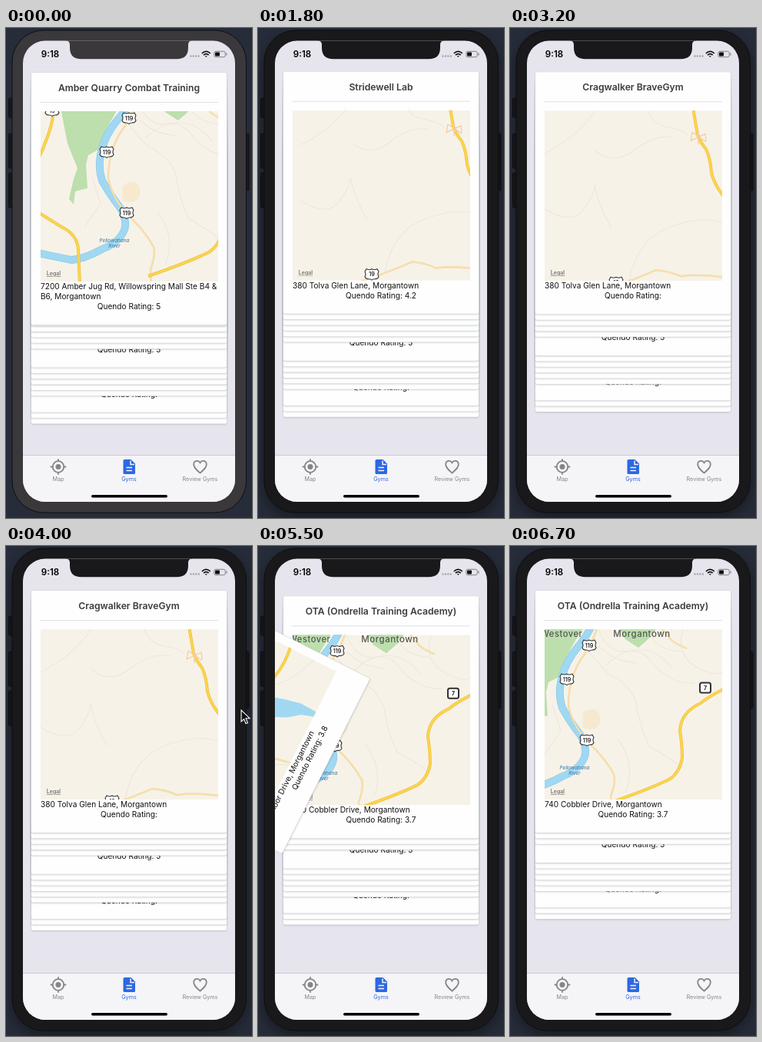
An HTML page that plays this animation: 320 by 636 pixels, repeating every 6.8 s.

```html
<!DOCTYPE html>
<html lang="en">
<head>
<meta charset="utf-8">
<title>Gym cards</title>
<style>
html, body { margin: 0; width: 100%; height: 100%; overflow: hidden; background: #262c39; }
body, svg text { font-family: Inter, Roboto, sans-serif; }
#frame, #screen, #pointer { position: absolute; left: 0; top: 0; width: 320px; height: 636px; overflow: hidden; }
#screen { background: #e6e5ee; clip-path: inset(16.5px 22px 21px 22px round 29px); }
#ui { position: absolute; left: 0; top: 0; z-index: 50; }
#body { fill: #3a383b; }
.active #body { fill: #19181a; filter: drop-shadow(0 6px 8px rgba(0, 0, 0, .4)); }
.card {
  position: absolute; left: 33px; top: 0; width: 254px; box-sizing: border-box;
  background: #fefefe; border-radius: 2px; color: #111; font-size: 10.15px; line-height: 12.5px;
  box-shadow: 0 0 0 .5px #d2d6dc, 0 1.3px 2.2px rgba(0, 0, 0, .16);
}
.card > * { position: absolute; white-space: nowrap; }
.title {
  left: 0; width: 254px; top: 10px; line-height: 19px; text-align: center;
  font-size: 12.2px; font-weight: 600; color: #3b3b3d;
}
.rule { left: 11px; width: 232px; top: 38px; height: 1px; background: #dfe1e5; }
.card svg { left: 12px; top: 50px; }
.address { left: 12px; top: 271px; }
.rating { left: 0; width: 254px; text-align: center; }
</style>
</head>
<body>
<svg id="frame" viewBox="0 0 320 636">
  <g fill="#18191d" stroke="#101115">
    <rect x="3.5" y="91" width="7" height="25" rx="1.5"/>
    <rect x="3.5" y="137" width="7" height="45" rx="1.5"/>
    <rect x="3.5" y="188" width="7" height="45" rx="1.5"/>
    <rect x="309" y="137" width="7" height="74" rx="1.5"/>
  </g>
  <rect id="body" x="8" y="3" width="304.5" height="626" rx="41" stroke="#0f0f12"/>
</svg>

<div id="screen">
  <svg id="ui" width="320" height="636">
    <path id="notch" d="M78 16V16.500Q83 16.500 83 22V25.500Q83 40.300 98 40.300H222Q237 40.300 237 25.500V22Q237 16.500 242 16.500V16Z"/>
    <text x="57.5" y="38" font-size="11.6" font-weight="600" text-anchor="middle">9:18</text>
    <path d="M239.5 36.5H252" stroke="#9a9aa2" stroke-width="2" stroke-dasharray="2 1.4"/>
    <g fill="none" stroke="#111" stroke-width="1.7">
      <path d="M254.8 33Q260.3 27.8 265.8 33M256.9 35.2Q260.3 32 263.7 35.2"/>
      <path d="M258.7 36.2L260.3 38L261.9 36.2Z" fill="#111" stroke="none"/>
      <rect x="270.8" y="30.3" width="14.4" height="7.4" rx="2" stroke="#77777e" stroke-width=".9"/>
      <rect x="272" y="31.5" width="6" height="5" rx="1" fill="#111" stroke="none"/>
      <path d="M287 32.6V35.4" stroke="#77777e" stroke-width="1.1"/>
    </g>
    <rect x="20" y="554" width="280" height="64" fill="#f5f4f7"/>
    <path d="M20 554.5H300" stroke="#cbcbd1"/>
    <g fill="none" stroke="#858589" stroke-width="1.8">
      <circle cx="68" cy="569.5" r="7.3"/>
      <path d="M68 559.2V563M68 576V579.8M57.7 569.5H61.5M74.5 569.5H78.3"/>
      <circle cx="68" cy="569.5" r="3.5" fill="#858589" stroke="none"/>
      <path d="M252.5 577.6C247.5 573.3 244.2 570.3 244.2 566.5C244.2 561.3 250.3 560.3 252.5 564.3C254.7 560.3 260.8 561.3 260.8 566.5C260.8 570.3 257.5 573.3 252.5 577.6Z"/>
    </g>
    <path d="M154.5 560H162.5L168 565.5V577.5Q168 579 166.5 579H154.5Q152.5 579 152.5 577.5V561.5Q152.5 560 154.5 560Z" fill="#2b68e3"/>
    <path d="M162 561.5V566.5H167M156.5 570.5H164M156.5 574.5H164" fill="none" stroke="#f5f4f7" stroke-width="1.5"/>
    <g font-size="7.2" text-anchor="middle" fill="#858589">
      <text x="68" y="588">Map</text>
      <text x="160" y="588" fill="#2b68e3">Gyms</text>
      <text x="252.5" y="588">Review Gyms</text>
    </g>
    <rect x="111" y="606" width="99" height="3.5" rx="1.75"/>
  </svg>
</div>

<svg id="pointer" viewBox="0 0 320 636">
  <path id="arrow" d="M0 0V15L3.5 11.7L6 17.5L8.5 16.4L6 10.7H11Z" fill="#111" stroke="#fff" stroke-width="1.1"/>
</svg>

<script>
const LOOP = 6800, STEP = 7.36, REST = 58, TILT = 0.2986, FOCUS = 1000;

// map drawing helpers
const line = (d, color, w) =>
  `<path d="${d}" fill="none" stroke="${color}" stroke-width="${w}" stroke-linejoin="round"/>`;
const area = (d, color) => `<path d="${d}" fill="${color}"/>`;
const highway = d => line(d, '#e8bd4c', 4) + line(d, '#fcd548', 2.8);
const road = d => line(d, '#ecd09a', 2.3) + line(d, '#fbe3ab', 1.4);
const lane = d => line(d, '#ede6dc', 1.1);
const label = (x, y, s, size, color, extra = '') =>
  `<text x="${x}" y="${y}" font-size="${size}" fill="${color}" text-anchor="middle" ${extra}>${s}</text>`;
const shield = (x, y, n) => `<g transform="translate(${x} ${y})">
  <path d="M-7-7Q-3-5 0-7Q3-5 7-7L9-3.5Q7 0 9 3Q8 6 4 6Q1 6 0 7.5Q-1 6-4 6Q-8 6-9 3Q-7 0-9-3.5Z"
    fill="#fff" stroke="#333" stroke-width="1.1"/>${label(0, 2.7, n, 7.2, '#222', 'font-weight="600"')}</g>`;
const plate = (x, y, n) =>
  `<rect x="${x - 7}" y="${y - 6.5}" width="14" height="13" rx="2.5" fill="#fff" stroke="#333" stroke-width="2"/>` +
  label(x, y + 2.6, n, 7, '#222', 'font-weight="700"');
const shift = (x, y, s) => `<g transform="translate(${x} ${y})">${s}</g>`;

const river = 'M110 95Q100 118 89 130Q72 150 67 172Q62 192 68 210Q78 228 92 246Q101 262 97 274Q90 291 68 299Q45 312 28 313Q8 309-20 303';
const valley =
  area('M11 100H100Q72 140 63 170L50 177L47 190L49 220L33 224L31 241L25 234L31 208L36 194L23 162Z', '#bcdfad') +
  area('M132 90H202L183 118L167 132L150 121Z', '#bcdfad') +
  area('M94 218Q103 208 114 214Q121 224 115 234Q105 241 95 236Z', '#f6e9cf') +
  ['M89 118Q108 146 128 166Q154 177 164 202Q168 233 181 260Q200 270 219 284', 'M115 108Q128 143 158 136T212 160',
   'M125 155Q160 120 184 150T240 178', 'M225 108Q214 145 250 161T280 140', 'M45 270L66 240L55 205',
   'M180 108Q186 135 224 137', 'M140 250Q165 285 150 320', 'M92 130Q112 125 124 137T166 152'].map(lane).join('') +
  line(river, '#8ac7e5', 9.8) + line(river, '#a0d8f2', 8.6) +
  road('M113 108Q105 130 91 149Q76 175 76 207Q82 235 104 257Q124 276 135 296Q138 307 131 325L132 345') +
  road('M198 108L210 122Q217 128 230 133') +
  highway('M6 112Q4 137-5 158Q-11 176-20 190') +
  highway('M-20 248Q2 262 15 270Q36 280 37 300L39 345') +
  highway('M290 180Q263 192 248 204Q222 216 221 240Q224 258 224 275Q221 294 207 303Q180 316 128 334') +
  shield(103, 129, '119') + shield(74, 173, '119') + shield(100, 252, '119') + shield(3, 119, '19') +
  ['Pellowahana', 'River'].map((s, i) =>
    label(84, 290 + i * 7, s, 6.3, '#4d83a8', 'font-style="italic" font-weight="500"')).join('');

const hills =
  ['M45 163Q85 145 111 108', 'M111 160Q135 180 162 159T213 143', 'M45 235Q80 257 95 237T110 205',
   'M155 329Q165 276 205 260T276 253', 'M110 205Q116 234 132 260', 'M180 108Q185 126 207 130T232 141'].map(lane).join('') +
  road('M110 345Q158 329 190 315Q207 316 222 323Q246 319 290 326') +
  highway('M237 92L239 110L244 139Q248 150 255 158Q261 171 262 189Q266 204 277 218L300 235') +
  line('M237 136L254 148M235 147L254 138M245 134V152M237 136L235 147M254 138L255 148', '#f2cda0', 1.3) +
  shield(138, 331, '19');

const lake =
  ['M214 108Q230 160 276 178', 'M70 108Q109 123 128 108', 'M45 303Q85 268 112 240T121 290L140 329',
   'M195 181Q220 170 232 133', 'M215 250Q228 280 276 296', 'M60 329Q88 295 112 315'].map(lane).join('') +
  road('M104 108Q113 132 139 139Q160 145 180 137') + road('M183 157Q206 126 238 121L276 108') +
  road('M141 208Q111 231 109 247Q130 260 134 285L143 329') +
  area('M45 115L58 121L72 115L86 120L100 125L106 134L104 146L110 155L124 164L131 181L141 208L150 228L163 240L178 246L189 254L197 266L208 266L213 284L218 306L217 329H210L205 313L194 299L186 282L176 268L160 258L146 245L134 230L124 213L108 206L98 192L84 184L75 170L65 150L58 140L45 137Z', '#a0d8f2') +
  area('M119 155Q130 153 137 165L149 184Q160 180 164 188L184 203L188 226L172 229L152 222L140 207L128 182Z', '#c2e4b0') +
  highway('M35 255Q65 238 85 228Q110 214 130 205Q150 198 160 191Q173 187 180 196Q190 218 196 230Q208 250 226 258Q250 266 280 261') +
  highway('M160 191Q180 190 183 176Q184 150 181 135Q182 122 193 106') +
  plate(194, 106, '7') +
  label(0, 0, 'Plumb Rd', 6.5, '#555', 'transform="translate(163 184) rotate(-28)"') +
  label(0, 0, 'Osmond Rd', 6.5, '#555', 'transform="translate(125 269) rotate(63)"') +
  '<circle cx="155" cy="207" r="4.7" fill="#65a957"/><path d="M152.5 209H157.5M155 209V204" stroke="#fff"/>' +
  ['Fernmoor Golf', 'Resort - Golf', 'Course'].map((s, i) =>
    label(155, 220 + i * 7.7, s, 6.4, '#4d9441', 'font-weight="600" stroke="#eef6e5" stroke-width="1.5" paint-order="stroke"')).join('');

const town = valley + plate(254, 184, '7') +
  label(67, 118, 'Westover', 11.2, '#555', 'font-weight="500" letter-spacing=".5"') +
  label(171.5, 118, 'Morgantown', 11.5, '#555', 'font-weight="500" letter-spacing=".5"');

const mapSvg = art => `<svg width="231" height="221" viewBox="45 108 231 221">
  <rect x="45" y="108" width="231" height="221" fill="#f7f2e8"/>${art}
  ${label(62, 321, 'Legal', 7, '#777', 'font-weight="600" text-decoration="underline" stroke="#f7f2e8" stroke-width="1.5" paint-order="stroke"')}</svg>`;

// cards, front to back
const cards = [
  { h: 327, title: 'Amber Quarry Combat Training', rating: '5', map: shift(57, -12, valley),
    address: '7200 Amber Jug Rd, Willowspring Mall Ste B4 &amp;<br>B6, Morgantown' },
  { h: 314, title: 'Stridewell Lab', rating: '4.2', map: shift(10, -10, hills), address: '380 Tolva Glen Lane, Morgantown' },
  { h: 314, title: 'Cragwalker BraveGym', rating: '', map: hills, address: '380 Tolva Glen Lane, Morgantown' },
  { h: 314, title: 'Fernmoor Fitness Center', rating: '3.8', map: lake, address: '1 Fernmoor Drive, Morgantown' },
  { h: 314, title: 'OTA (Ondrella Training Academy)', rating: '3.7', map: town, address: '740 Cobbler Drive, Morgantown' },
];
for (let i = 5; i < 16; i++)
  cards.push({ h: i < 7 ? 314 : i < 13 ? 331 : 345, rating: i < 13 ? '5' : '' });

const screen = document.getElementById('screen');
cards.forEach((c, i) => {
  const el = c.el = document.createElement('div');
  el.className = 'card';
  el.style.height = c.h + 'px';
  el.style.zIndex = cards.length - i;
  el.innerHTML = (c.title ? `<div class="title">${c.title}</div><div class="rule"></div>${mapSvg(c.map)}
    <div class="address">${c.address}</div>` : '') +
    `<div class="rating" style="top:${c.h - 30.5}px">Quendo Rating: ${c.rating}</div>`;
  screen.append(el);
});

// one swipe per front card: start, end, direction
const swipes = [[1000, 1522, -1], [2400, 2881, 1], [4030, 4330, 1], [5150, 5632, -1]];

function spring(ms) {
  if (ms <= 0) return 0;
  const s = ms / 1000, w = 13.7;
  return 1 - Math.exp(-6.5 * s) * (Math.cos(w * s) + 6.5 / w * Math.sin(w * s));
}

const arrow = document.getElementById('arrow');
function drawPointer(t) {
  const enter = Math.min(1, (t - 3880) / 100), leave = Math.max(0, (t - 4200) / 400);
  arrow.style.display = t > 3880 && t < 4900 ? '' : 'none';
  arrow.setAttribute('transform', `translate(${300 + 6 * enter + 8.5 * leave} ${213 + 14 * leave})`);
}

const frame = document.getElementById('frame');
const notch = document.getElementById('notch');
function draw(now) {
  const t = now % LOOP;
  // the phone window darkens once it gains focus
  frame.classList.toggle('active', t >= FOCUS);
  notch.style.fill = t >= FOCUS ? '#19181a' : '#3a383b';
  const risen = swipes.reduce((sum, s) => sum + spring(t - s[1]), 0);
  cards.forEach((c, i) => {
    const [start, end, dir] = swipes[i] || [LOOP, LOOP, 0];
    const x = t > start ? dir * 320 * ((t - start) / (end - start)) ** 1.3 : 0;
    c.el.style.visibility = t < end ? 'visible' : 'hidden';
    c.el.style.transform = `translate(${x}px, ${REST + STEP * (i - risen)}px) rotate(${x * TILT}deg)`;
  });
  drawPointer(t);
}

const begin = performance.now();
function tick() {
  draw(performance.now() - begin);
  requestAnimationFrame(tick);
}
tick();
</script>
</body>
</html>
```
